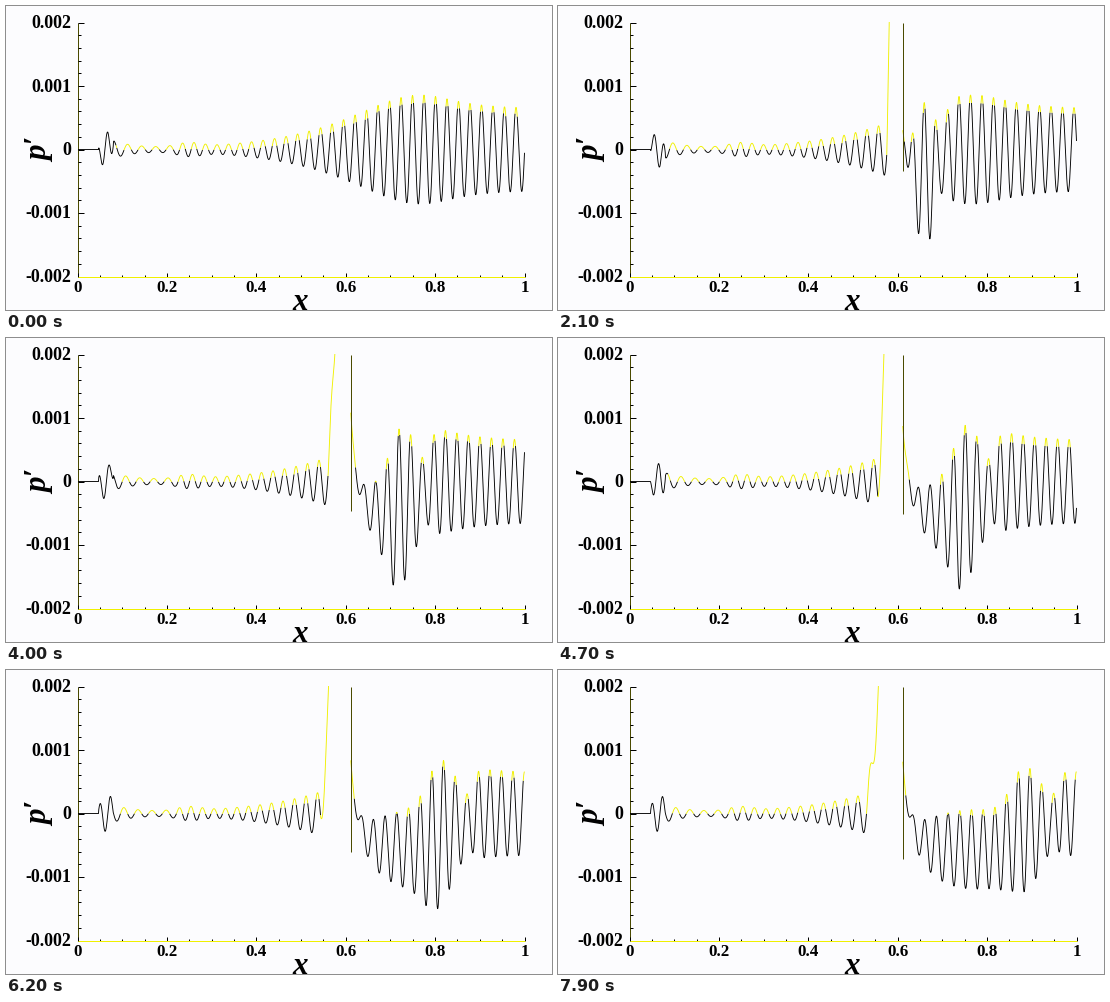
A matplotlib script for the animation above (8000 ms loop, 546 by 304 pixels).

```python
import numpy as np
import matplotlib.pyplot as plt
from matplotlib.animation import FuncAnimation
from matplotlib.patches import Rectangle

W, H, DPI = 546, 304, 100
FRAMES, STEP = 80, 100
LEFT, RIGHT, TOP, BOTTOM, ZERO = 71.5, 518.5, 16.5, 270.5, 143.5
WAVELENGTH, FREQ = 11.5, 0.176    # pixels, cycles per frame
WALL = 344.5                      # fixed right edge of the pulse
INK, YELLOW, OLIVE = "#000000", "#f0f000", "#4a4a00"
PX = 72 / DPI

xs = np.arange(LEFT, RIGHT + 0.01, 0.25)


def cosc(cycles):
    return np.cos(2 * np.pi * cycles)


def bell(u):
    return np.exp(-u ** 2)


def step(u):
    return 0.5 + 0.5 * np.tanh(u / 2)


def base_amplitude():
    growth = 54.5 / np.cosh((xs - 415) / 64)
    settle = 41 + 13.5 / np.cosh((xs - 415) / 30)
    entry = 8 * np.exp(-np.abs(xs - 107) / 22) + 4 * bell((xs - 183) / 17)
    gate = np.clip((xs - 102) / 6, 0, 1)
    return gate * (entry + np.where(xs < 415, growth, settle))


AMP = base_amplitude()
# the wave is stretched upstream of x = 171
CYCLES = np.maximum((xs - 171) / WAVELENGTH, (xs - 171) / 14)
STRIP = np.sqrt(np.sin(np.pi * np.clip((xs - 92.5) / 15, 0, 1)))
RIGHT_SIDE = xs > WALL
DIST = np.maximum(xs - WALL, 0)


def wave(t):
    """Curve height in pixels above zero, and the yellow mask."""
    d = 343.7 + 1.92 * t - xs          # distance behind the fast front
    lag = d - 8 - 0.43 * t             # distance behind the slow front
    since = max(t - 9, 0)
    on = np.clip((t - 1) / 4, 0, 1) * RIGHT_SIDE

    gain = (1 - 0.38 * bell((d - 2) / 8) + 0.38 * bell((d - 29) / 13)
            - 0.27 * step((d - 50) / 6))
    near = 1 + (np.tanh(DIST / 23) - 1) * np.clip((d + 12) / 14, 0, 1)
    packet = on * bell((xs - 350 - 1.4 * since) / min(6 + since / 2, 12))
    packet = packet * np.exp(-since / 17)
    amp = AMP * (1 + on * (gain * near - 1)) + 75 * packet

    sag = 13 * step((d + 1) / 3) + 23 * step(lag / 6)
    mean = on * sag * (1 - np.exp(-DIST / 13)) + 12 * packet

    # oscillating tail behind the wall
    tail = (45 + 30 * cosc(FREQ * t - 0.1)) * np.clip(since / 6, 0, 1)
    mean = mean - RIGHT_SIDE * tail * np.exp(-DIST / 5)

    drift = on * 0.0015 * np.maximum(d, 0)
    osc = cosc(CYCLES - FREQ * (t - 21) + drift)
    y = amp * osc - mean
    y = y + 18 * STRIP * cosc((xs - 103.6) / 11 + FREQ * t)

    # pulse, widening upstream
    grow = np.clip((t - 1) / 4, 0, 1)
    u = np.maximum(xs - 336 + 0.345 * t, 0) / max(2, 0.155 * t - 0.3)
    rising = (u > 0) & ~RIGHT_SIDE & (grow > 0)
    y = y + 127 * grow * u ** 1.2 * rising

    lit = (amp * (1 - osc) < 6) & (y > 0) & (xs > 110)
    return y, lit | rising


fig = plt.figure(figsize=(W / DPI, H / DPI), dpi=DPI, facecolor="#fcfcfe")
ax = fig.add_axes([0, 0, 1, 1])
ax.set(xlim=(0, W), ylim=(H, 0))
ax.axis("off")


def stroke(x, y, color=INK, width=1.0, **kw):
    return ax.plot(x, y, color=color, lw=width * PX,
                   solid_capstyle="butt", **kw)[0]


def label(x, y, text, size=18, **kw):
    ax.text(x, y, text, family="Liberation Serif", weight="bold",
            size=size * PX, va="baseline", color=INK, **kw)


# axes, ticks and labels
stroke([LEFT, LEFT], [TOP, BOTTOM], OLIVE)
for i in range(21):
    y = BOTTOM - (BOTTOM - TOP) * i / 20
    stroke([LEFT, LEFT + (6 if i % 5 == 0 else 3)], [y, y])
    x = LEFT + (RIGHT - LEFT) * i / 20
    stroke([x, x], [BOTTOM, BOTTOM - (4 if i % 4 == 0 else 2)])
stroke([LEFT, RIGHT], [BOTTOM, BOTTOM], YELLOW)
for i in range(5):
    value = (2 - i) / 1000
    label(65, TOP + 63.5 * i + 5.5, f"{value:g}", ha="right")
for i in range(6):
    label(LEFT + 89.4 * i, 286.5, f"{i / 5:g}", size=17, ha="center")
label(294.5, 303.5, "x", size=31, style="italic", ha="center")
label(42, 143.5, "p\u2032", size=31, style="italic", ha="center",
      rotation=90, rotation_mode="anchor")

window = Rectangle((LEFT, TOP - 0.5), RIGHT - LEFT + 1, BOTTOM - TOP + 1,
                   transform=ax.transData)
curve = stroke([], [], width=0.9)
glow = stroke([], [], YELLOW, width=0.9)
wall = stroke([], [], OLIVE)
for line in (curve, glow, wall):
    line.set_clip_path(window)


def draw(n):
    t = max(n, 1)
    h, lit = wave(t)
    y = np.clip(ZERO - h, -40, H)
    if t > 1:
        wall.set_data([WALL, WALL], [TOP, 157 + 0.4 * t])
        y[np.abs(xs - WALL) < 0.2] = np.nan
    else:
        wall.set_data([], [])
    curve.set_data(xs, np.where(lit, np.nan, y))
    # let the yellow part touch its dark neighbours
    lit = lit | np.roll(lit, 1) | np.roll(lit, -1)
    glow.set_data(xs, np.where(lit, y, np.nan))
    return curve, glow, wall


anim = FuncAnimation(fig, draw, frames=FRAMES, interval=STEP,
                     repeat=True, repeat_delay=0, blit=False)
plt.show()
```
